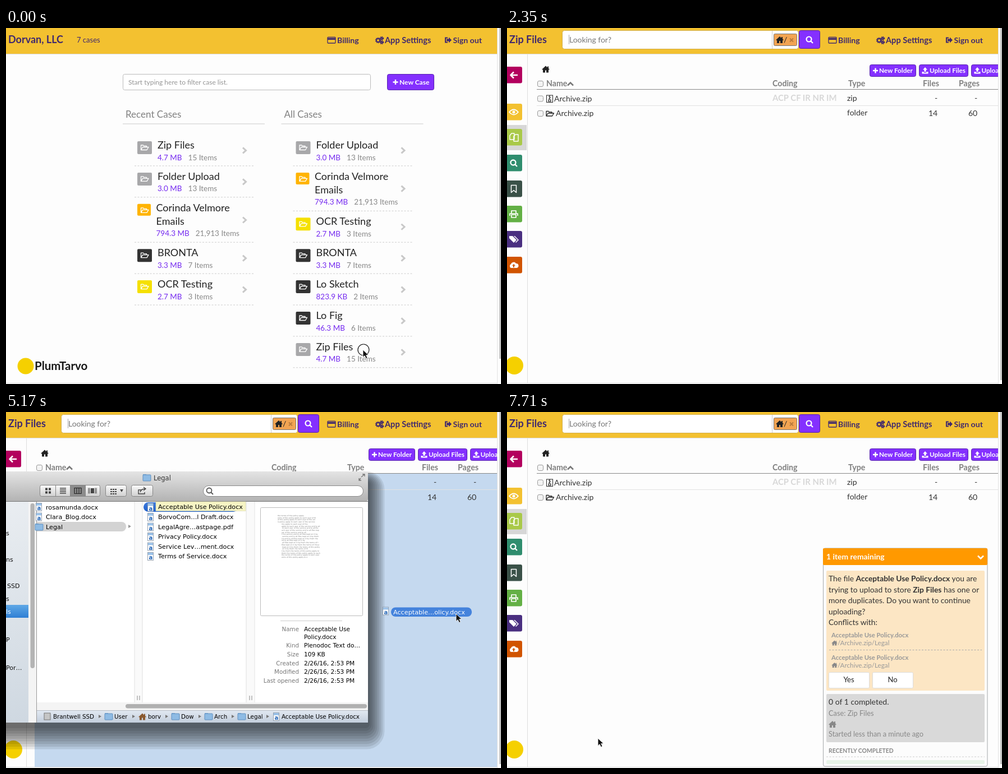
Animation of 882 by 635 pixels, one loop 8 s. Source, as an HTML page:

```html
<!DOCTYPE html>
<html lang="en">
<head>
<meta charset="utf-8">
<title>Case file upload</title>
<style>
html, body { margin: 0; width: 100%; height: 100%; overflow: hidden; background: #fdfdfd; }
svg { display: block; width: 100vw; height: 100vh; font-family: Lato, sans-serif; }
text { white-space: pre; }
.b { font-weight: 700; }
.finder { font-family: "DejaVu Sans", sans-serif; }
</style>
</head>
<body>
<svg id="stage" viewBox="0 0 882 635"></svg>
<script>
const PURPLE = '#8430ff', INK = '#40296e', GOLD = '#f3c130', DARK = '#333', GREY = '#888';

// Drawing helpers
const text = (x, y, s, size = 14, fill = DARK, attrs = '') =>
  `<text x="${x}" y="${y}" font-size="${size}" fill="${fill}" ${attrs}>${s}</text>`;
const bold = (x, y, s, size, fill, attrs = '') => text(x, y, s, size, fill, 'class="b" ' + attrs);
const rect = (x, y, w, h, fill, attrs = '') =>
  `<rect x="${x}" y="${y}" width="${w}" height="${h}" fill="${fill}" ${attrs}/>`;
const dot = (x, y, r, fill, attrs = '') => `<circle cx="${x}" cy="${y}" r="${r}" fill="${fill}" ${attrs}/>`;
const shape = (d, x, y, fill) => `<path d="${d}" transform="translate(${x} ${y})" fill="${fill}" fill-rule="evenodd"/>`;
const line = (d, x, y, stroke, w = 1, attrs = '') =>
  `<path d="${d}" transform="translate(${x} ${y})" fill="none" stroke="${stroke}" stroke-width="${w}" ${attrs}/>`;
const group = (id, body, attrs = '') => `<g id="${id}" ${attrs}>${body}</g>`;
const dashes = (x, y, w, color = '#ccc') => line(`M0 0h${w}`, x, y, color, 1, 'stroke-dasharray="3 2.5"');
const each = (list, fn) => list.map(fn).join('');
const range = n => [...Array(n).keys()];

// Icons, centred on x, y
const home = (x, y, fill) => shape('M-7 .5 0-6 3-3V-5H5V-1.500L7 .5 5 1V6H1V2H-1V6H-5V1z', x, y, fill);
const openFolder = (x, y, c, w = 1.3) => line('M-6 4.500V-4h4l1 1.500h5V-.5M-6 4.500l3-5H7.500l-3 5z', x, y, c, w, 'stroke-linejoin="round"');
const lens = (x, y, c, w = 2) => line('M2.500 2.500 6 6M3.500-1A4.500 4.500 0 1 1-5.500-1 4.500 4.500 0 1 1 3.500-1', x, y, c, w);
const plus = (x, y) => line('M-4.500 0h9M0-4.500v9', x, y, '#fff', 2.4);
const upload = (x, y) => shape('M0-6 4-1.500H1.500V2H-1.500V-1.500H-4zM-5.500 2h3v1.500h5V2h3V5.500h-11z', x, y, '#fff');
const gear = (x, y, r) => dot(x, y, r, 'none', `stroke="${INK}" stroke-width="2"`) +
  dot(x, y, r + 1.5, 'none', `stroke="${INK}" stroke-width="1.500" stroke-dasharray="1.500 1.300"`);
const folder = (x, y) => rect(x, y - 6, 6, 3, '#6d9fd0') + rect(x, y - 5, 14, 11, '#8ebbe4', 'rx="1" stroke="#5f8fc0"');
const doc = (x, y) => rect(x + .5, y - 7.5, 10, 14, '#fff', 'stroke="#8a98a8" stroke-width=".9"') +
  rect(x + 1, y - 7, 9, 4, '#9cc3ea') + bold(x + 2.5, y + 5, 'a', 10, '#1f62b5');

const button = (x, y, w, h, label, size, icon, iconX, textX) =>
  rect(x + .5, y + .5, w, h, PURPLE, 'rx="3" stroke="#5522ac"') + icon(iconX, y + h / 2 + .5) +
  bold(textX, y + h / 2 + 4.5, label, size, '#fff');

function header(title) {
  return rect(0, 0, 875, 46, GOLD) + rect(0, 46, 875, 1, '#ddd') + bold(4, 27, title, 18, INK) +
    rect(573, 16.500, 14, 10.500, 'none', `rx="1" stroke="${INK}" stroke-width="1.300"`) + rect(573, 18, 14, 3, INK) +
    gear(663, 22, 3) + gear(669.500, 18.500, 1.500) + gear(669.500, 25.500, 1.500) +
    shape('M0-5H5V-3H2V3H5V5H0zM3-2H7V-5L12 0 7 5V2H3z', 782, 21.500, INK) +
    bold(590, 26.500, 'Billing', 14.1, INK) + bold(675, 26.500, 'App Settings', 14.6, INK) +
    bold(796.500, 26.500, 'Sign out', 14.1, INK);
}

function frame(thumb) {
  return line('M.5 0V635', 875, 0, '#e4e4e4') + rect(879, 0, 3, thumb, '#c1c1c1') + rect(0, 633, 875, 1, '#ddd');
}

// Case list
const CASES = {
  zip: ['#a8a8aa', ['Zip Files'], '4.7 MB', '15 Items'],
  upload: ['#a8a8aa', ['Folder Upload'], '3.0 MB', '13 Items'],
  mail: ['#ffb400', ['Corinda Velmore', 'Emails'], '794.3 MB', '21,913 Items'],
  bronta: ['#333', ['BRONTA'], '3.3 MB', '7 Items'],
  ocr: ['#f5e000', ['OCR Testing'], '2.7 MB', '3 Items'],
  sketch: ['#333', ['Lo Sketch'], '823.9 KB', '2 Items'],
  fig: ['#333', ['Lo Fig'], '46.3 MB', '6 Items'],
};

function caseColumn(x, title, keys) {
  let top = 190;
  return text(x - 21, 160, title, 17, '#808080') + rect(x - 26, 170.500, 253, 1, '#ccc') + each(keys, key => {
    const [color, names, size, items] = CASES[key];
    const wide = names.length > 1, height = wide ? 80.4 : 55.9, textX = x + (wide ? 33.5 : 36);
    const last = top + 25 + (wide ? 24 : 0);
    const row = rect(x, top + 12, wide ? 24 : 26, wide ? 21 : 23, color, 'rx="2"') +
      openFolder(x + 12.500, top + 23, '#fff') +
      each(names, (name, i) => text(textX, top + 25 + 24 * i, name, 18, '#222')) +
      text(textX, last + 20.500, `${size}<tspan dx="11" fill="${GREY}">${items}</tspan>`, 13.5, '#752af0') +
      line('M-3-5 2.500 0-3 5', x + 191, top + height / 2 + .5, '#c8c8c8', 3) + dashes(x - 5, top + height, 212);
    top += height;
    return row;
  });
}

const homePage = header('Dorvan, LLC') + text(126, 26, '7 cases', 13, INK) +
  rect(208.500, 82.500, 441, 28, '#fff', 'rx="3" stroke="#bbb"') +
  text(218, 101, 'Start typing here to filter case list.', 12, '#949494') +
  button(679, 82, 83, 28, 'New Case', 12, plus, 694, 701) +
  caseColumn(234, 'Recent Cases', ['zip', 'upload', 'mail', 'bronta', 'ocr']) +
  caseColumn(516.500, 'All Cases', ['upload', 'mail', 'ocr', 'bronta', 'sketch', 'fig', 'zip']) +
  dot(35, 603, 14.500, '#f5d000') + bold(51, 610, 'PlumTarvo', 20.5, '#181818') + frame(590);

// Case page
const white = (d, w = 1.8) => y => line(d, 12, y, '#fff', w, 'stroke-linejoin="round"');
const SIDEBAR = [
  [69, '#b3005e', white('M7 0H-5M0-5.500-5.500 0 0 5.500', 2.5)],
  [135, GOLD, y => white('M-8 0Q0-9 8 0 0 9-8 0z')(y) + dot(12, y, 2.5, '#fff')],
  [180, '#a9c949', white('M-7-3l3-4H1V4H-7zM0-2l3-3H8V7H0z', 1.4)],
  [226, '#2f8d6e', y => lens(12, y, '#fff', 2.3)],
  [272, '#3a5148', white('M-4.500-6.500h9v13L0 2.500l-4.500 4z', 1.5)],
  [317, '#63b045', white('M-4-1V-6H4V-1M-7 3V-1H7V3M-4 1H4V6H-4z', 1.7)],
  [362, '#4a2f80', y => shape('M-8-6H-2L5 1 0 6-8-2zM0-6H2L9 1 4 6 3 5 7 1z', 12, y, '#fff')],
  [408, '#d15400', y => shape('M-5 5A4 4 0 0 1-5-2 5 5 0 0 1 4-3 4 4 0 0 1 5 5zM0-2-3 1H-1V4H1V1H3z', 12, y, '#fff')],
];
const shell = header('Zip Files') +
  rect(98.500, 4.500, 421, 33, '#fff', 'rx="4" stroke="#d0ae4a"') + line('M.5 5V37', 472, 0, '#ccc') +
  line('M.5 12V29', 110, 0, '#aaa') + text(111, 25.500, 'Looking for?', 13.9, '#777') +
  rect(475.500, 10.500, 41, 21, '#f2a452', 'rx="2" stroke="#777"') + home(486, 21, '#222') +
  text(493, 26, '/', 14, '#222') + line('M-3-3 3 3M3-3-3 3', 507, 21.500, '#b97b3d', 2) +
  rect(520.500, 4.500, 37, 32, PURPLE, 'rx="3" stroke="#5522ac"') + lens(539, 21, '#fff', 2.2) +
  line('M.5 47V633', 36, 0, '#ddd') + rect(0, 173, 35, 45, '#d7d7d7') +
  each(SIDEBAR, ([y, color, icon]) => rect(-3, y, 30, 29.500, color, 'rx="3"') + icon(y + 15)) +
  dot(13, 602, 16, '#f5d000');

const checkbox = y => rect(54.500, y - 5, 10, 10, '#f4f4f4', 'rx="2.500" stroke="#999"');
const table = home(69, 73.500, '#222') +
  button(646, 65, 82, 21, 'New Folder', 11.7, plus, 656.500, 663) +
  button(734, 65, 87, 21, 'Upload Files', 11.7, upload, 745, 753) +
  `<svg width="875" height="100">${button(827, 65, 90, 21, 'Upload Folder', 11.7, upload, 838, 845.5)}</svg>` +
  checkbox(99.500) + line('M-5 3 0-2 5 3', 113, 99.500, '#777', 2.5) +
  each([['Name', 70], ['Coding', 473], ['Type', 608], ['Files', 741], ['Pages', 805]], ([s, x]) => bold(x, 104, s, 14.2, '#808080')) +
  rect(53, 109, 822, 1, '#888') + rect(53, 138, 822, 1, '#e2e2e2') +
  checkbox(126) + rect(70.500, 120, 11, 12.500, '#fff', 'stroke="#222"') + line('M0-6V1M-2-4H0M0-2H2M-2 0H0M-2 2H2V5H-2z', 76, 126, '#222', 1.2) +
  text(84, 130.500, 'Archive.zip', 14) + bold(473, 130, 'ACP CF IR NR IM', 14.9, '#d8d8d8') +
  text(606, 130, 'zip', 14) + text(762, 130, '-', 14) + text(833, 130, '-', 14) +
  checkbox(152.500) + openFolder(76, 152.500, '#222') + text(87, 157, 'Archive.zip', 14) +
  text(606, 156, 'folder', 14) + text(751, 157, '14', 14) + text(822, 157, '60', 14);

// Upload panel
const panelFrame = (y, color) => rect(563.500, y, 292.500, 632 - y, '#fcfcfc', 'rx="3" stroke="#a5a8aa"') +
  rect(563, y, 293, 30, color, 'rx="2"') + bold(569, y + 20, '1 item remaining', 13.9, '#fff') +
  line('M-5-2.500 0 2.500 5-2.500', 844, y + 16, '#fff', 2.6);
const progress = (y, doneHeight) => rect(569, y, 282, 86, '#d9d9d9', 'rx="2"') +
  text(573, y + 19, '0 of 1 completed.') + text(573, y + 39, 'Case: Zip Files', 12.8, GREY) +
  home(580, y + 54, GREY) + text(573, y + 76, 'Started less than a minute ago', 12.8, GREY) +
  bold(573, y + 105, 'RECENTLY COMPLETED', 10.4, GREY) + dashes(569, y + 112, 282) +
  rect(569, y + 118, 282, doneHeight, '#e7f3e7', 'rx="2"');
const runningPanel = panelFrame(245, '#452a75') + progress(280, 83) + text(573, 417, '1 of 1 completed(1 skipped).', 13.8) +
  text(573, 434, 'Case: Zip Files', 12.8, GREY) + text(573, 471, 'Completed 31 Dec 1969', 12.8, GREY);
const strong = s => `<tspan class="b">${s}</tspan>`;
const conflictPanel = panelFrame(243, '#ff9900') + rect(569, 283, 282, 214, '#fce6c4', 'rx="2"') +
  each([`The file ${strong('Acceptable Use Policy.docx')} you are`, `trying to upload to store ${strong('Zip Files')} has one or`,
    'more duplicates. Do you want to continue', 'uploading?', 'Conflicts with:'], (s, i) => text(573, 302 + 19.5 * i, s, 13.8)) +
  each([402, 441.500], y => bold(578, y, 'Acceptable Use Policy.docx', 11.3, '#999') +
    `<g transform="translate(583.500 ${y + 10}) scale(.75)">${home(0, 0, GREY)}</g>` + text(589, y + 14, '/Archive.zip/Legal', 11.7, '#999')) +
  dashes(574, 424.500, 272, '#aaa') +
  each([['Yes', 573], ['No', 651]], ([s, x]) => rect(x + .5, 464.500, 72, 28, '#fff', 'rx="2" stroke="#ddd"') +
    text(x + 36, 482, s, 13, '#222', 'text-anchor="middle"')) +
  progress(503, 7);

// File browser window
const FILES = ['Acceptable…olicy.docx', 'BorvoCom…l Draft.docx', 'LegalAgre…astpage.pdf', 'Privacy Policy.docx', 'Service Lev…ment.docx', 'Terms of Service.docx'];
const INFO = [['Name', 'Acceptable Use', 391], ['', 'Policy.docx', 405], ['Kind', 'Plenodoc Text do…', 420], ['Size', '109 KB', 436],
  ['Created', '2/26/16, 2:53 PM', 451.5], ['Modified', '2/26/16, 2:53 PM', 467], ['Last opened', '2/26/16, 2:53 PM', 482.5]];
const CRUMBS = [['Brantwell SSD', 67], ['User', 176], ['borv', 236], ['Dow', 295], ['Arch', 354], ['Legal', 413], ['Acceptable Use Policy.docx', 475]];
const FINE_PRINT = 'the terms of this policy apply to each user of the service and to all files kept on it by them ';
const crumbIcon = (x, i) => i == 0 ? rect(x + 1, 537, 11, 12, '#c5c5c5', 'stroke="#777"') :
  i == 2 ? home(x + 7, 543.500, '#8a5a30') : i == 6 ? doc(x + 1, 544) : folder(x, 543);
const key = (x, w, fill) => rect(x + .5, 130.500, w, 20, fill, 'rx="3" stroke="#858585"');

// The window shadow falls off in visible bands
const shadow = each(range(9), i =>
  rect(-60, 122 - 2 * i, 708 + 3.3 * i, 442 + 6.7 * i, '#000', `rx="${8 + 3 * i}" opacity=".09"`));

const finder = shadow + rect(-10, 106, 655, 448, '#fff', 'rx="5"') +
  rect(-10, 106, 655, 54, 'url(#metal)', 'rx="5"') + rect(0, 159, 645, 1, '#777') +
  folder(244, 117) + text(263, 122, 'Legal', 11.5) + line('M-1-1 5-6M1-6H5V-2M-2 1-5 5M-5 1V5H-1', 634, 117, '#777', 1.3) +
  key(60, 107, 'url(#key)') + rect(114, 131, 27, 19, '#8c8c8c') + line('M28.500 0V20M54.500 0V20M81.500 0V20', 60, 131, '#858585') +
  each([-3, 3], dy => each([70, 76], x => rect(x, 138.500 + dy, 4, 4, '#444'))) +
  line('M0-4H11M0-1H11M0 2H11M0 5H11', 96, 140, '#444', 1.4) + line('M0-5H12V5H0zM4-5V5M8-5V5', 122, 140.500, '#222', 1.2) +
  line('M0-5V5M2-5V5M12-5V5M14-5V5', 147, 140.500, '#444') + rect(151, 136, 6, 9, '#444') +
  key(177, 37, 'url(#key)') + each([137, 141, 145], y => each([186, 190, 194], x => rect(x, y, 3, 2, '#444'))) + shape('M-3-2H3L0 3z', 206, 140, '#444') +
  key(223, 38, 'url(#key)') + line('M0-2H-5V5H6V2M-2 2Q0-4 7-4M4-7 8-4 4-1', 241, 141, '#444', 1.4) +
  rect(351.500, 131.500, 285, 19, '#fff', 'rx="9.500" stroke="#8a8a8a"') + lens(363, 141, '#555', 1.8) +
  rect(0, 160, 40, 394, 'url(#side)') + rect(0, 344, 40, 23, 'url(#mark)') + rect(40, 160, 14, 394, '#f4f4f4') +
  rect(43.500, 163, 7.500, 294, '#b4b4b4', 'rx="4"') +
  each([['s', 220], ['ns', 267], ['SSD', 313.5], ['s', 337], ['ls', 360, '#fff'], ['P', 410], ['Por…', 460]], ([s, y, fill = '#111']) =>
    text(s == 'SSD' ? 2 : 0, y, s, 11, fill)) +
  rect(54, 160, 1, 394, '#999') +
  rect(55, 196, 159, 17, '#d3d3d3', 'rx="8"') + rect(55, 196, 20, 17, '#d3d3d3') + shape('M-2-3 3 0-2 3z', 220, 204, '#999') +
  doc(53, 170) + doc(53, 187.500) + folder(52, 205) +
  each(['rosamunda.docx', 'Clara_Blog.docx', 'Legal'], (s, i) => text(71, 173.500 + 17.5 * i, s, 11.2, '#000')) +
  each([229, 428], x => rect(x, 160, 14, 358, '#fafafa')) +
  line('M0 160V518M14 160V518M199 160V518M214 160V518', 229, 0, '#e0e0e0') + line('M0 506v8M4 506v8M200 506v8M204 506v8', 234, 0, '#888') +
  rect(245, 161, 168.500, 17, 'url(#blue)', 'rx="8.500"') +
  each(FILES, (s, i) => doc(252, 170.500 + 17.5 * i) + text(271, 173.500 + 17.5 * i, s, 11.2, i ? '#000' : '#fff')) +
  rect(453.500, 170.500, 182, 193, '#fff', 'rx="2" stroke="#bbb"') +
  each(range(21), i => text(i < 4 ? 484 : 491, 186 + 3.7 * i, FINE_PRINT.repeat(2).substr(i * 5, i % 4 ? 44 : 30), 3.2, '#777')) +
  rect(489, 372, 110, 1, '#ccc') +
  each(INFO, ([label, value, y]) => text(522, y, label, 10.3, '#777', 'text-anchor="end"') + text(531, y, value, 10.6, '#000')) +
  rect(55, 518, 590, 14, '#f4f4f4') + rect(213, 521, 430, 7.500, '#b0b0b0', 'rx="4"') +
  rect(55, 532, 590, 22, 'url(#path)') + rect(55, 532, 590, 1, '#b5bbc4') +
  each(CRUMBS, ([s, x], i) => crumbIcon(x, i) + text(x + (i == 6 ? 16 : 17), 546.500, s, 10.3, '#000') +
    (i < 6 ? shape('M-2-3 3 0-2 3z', CRUMBS[i + 1][1] - 9, 543, '#777') : '')) +
  group('tooltip', rect(267, 160, 160, 16.500, '#f7f5c4', 'stroke="#d8d6a8" stroke-width=".6"') + text(271, 172.500, 'Acceptable Use Policy.docx', 11.2, '#000'));

const gradient = (id, from, to) => `<linearGradient id="${id}" x2="0" y2="1"><stop stop-color="${from}"/><stop offset="1" stop-color="${to}"/></linearGradient>`;
const arrow = 'M0 0V13.500L3 10.500 5.500 15.500 8 14.500 5.700 9.500H10z';

const stage = document.getElementById('stage');
stage.innerHTML = '<defs>' + gradient('metal', '#e4e4e4', '#b2b2b2') + gradient('key', '#fafafa', '#d0d0d0') +
  gradient('side', '#e9edf1', '#cfd8e1') + gradient('blue', '#3f7bdc', '#1f5fcc') + gradient('mark', '#5fa8e6', '#2f7fd4') +
  gradient('path', '#e2e9f2', '#c3cedc') + '</defs>' +
  rect(0, 0, 882, 635, '#fdfdfd') + rect(0, 0, 882, 47, '#fff') +
  group('home', homePage) +
  group('spinner', each(range(8), i => {
    const a = i * Math.PI / 4;
    return dot(476 + 21.5 * Math.sin(a), 91 - 21.5 * Math.cos(a), 4, '#999');
  })) +
  group('status', rect(-3, 630.500, 293, 8, '#e6e6e6', 'rx="3" stroke="#aaa"')) +
  group('shell', shell + frame(628)) +
  group('overlay', rect(51, 110, 824, 523, '#c5d9ef')) +
  group('table', table) +
  group('running', runningPanel) + group('conflict', conflictPanel) +
  group('finder', finder, 'class="finder"') +
  group('drag', doc(-15, 7) + rect(0, 0, 144, 16.500, '#3f7fdc', 'rx="8"') + text(4, 12.500, FILES[0], 11.2, '#fff'), 'class="finder"') +
  group('cursor', dot(1, 0, 10, 'none', 'id="press" stroke="#111" stroke-width="1.200"') +
    `<path d="${arrow}" fill="#111" stroke="#fff" stroke-width=".8"/>`);

// Time tracks: each value holds from its time until the next entry
const OPACITY = {
  home: [[0, 1], [290, .6], [440, .25], [590, 0]],
  spinner: [[0, 0], [440, 1], [1180, 0]],
  status: [[0, 0], [140, 1], [1180, 0]],
  shell: [[0, 0], [1180, 1]],
  table: [[0, 0], [1630, 1]],
  overlay: [[0, 0], [3830, 1], [5320, 0]],
  running: [[0, 0], [5470, 1], [7710, 0]],
  conflict: [[0, 0], [7710, 1]],
  finder: [[0, 0], [2940, 1], [6220, 0]],
  tooltip: [[0, 0], [5170, 1], [5620, .35], [5770, 0]],
  drag: [[0, .7], [3830, .95]],
  press: [[0, 1], [140, 0], [3390, 1], [3830, 0]],
};
const POSITION = {
  cursor: [[0, 636, 574], [290, 620, 570], [440, 600, 565], [590, 586, 561], [740, 581, 561], [1480, 620, 567], [1630, 675, 577],
    [1770, 720, 585], [1920, 733, 588], [2210, -99, 0], [3090, 470, 260], [3240, 410, 190], [3390, 400, 178], [3530, 470, 190],
    [3680, 569, 212], [3830, 733, 308], [3980, 791, 354], [4130, 802, 360], [5320, 770, 340], [5470, 585, 250],
    [5620, 370, 156], [5770, 310, 85], [5920, 285, 35], [6070, 275, 4], [6220, -99, 0], [7120, 60, 130], [7270, 130, 430], [7420, 162, 582]],
  drag: [[0, -300, 0], [3530, 336, 173], [3680, 435, 195.5], [3830, 605, 297], [3980, 674, 343], [4130, 686, 348.5], [5320, -300, 0]],
};
const at = (track, t) => track.findLast(entry => entry[0] <= t);
const byId = id => document.getElementById(id);
const dots = [...byId('spinner').children];

function draw(now) {
  const t = now % 8000;
  for (const id in OPACITY) byId(id).style.opacity = at(OPACITY[id], t)[1];
  for (const id in POSITION) {
    const [, x, y] = at(POSITION[id], t);
    byId(id).setAttribute('transform', `translate(${x} ${y})`);
  }
  const lead = Math.floor((t - 740) / 149) + 17;
  dots.forEach((d, i) => d.setAttribute('r', [6.8, 5.9, 5][(lead - i) % 8] || 4));
  requestAnimationFrame(draw);
}
requestAnimationFrame(draw);
</script>
</body>
</html>
```
